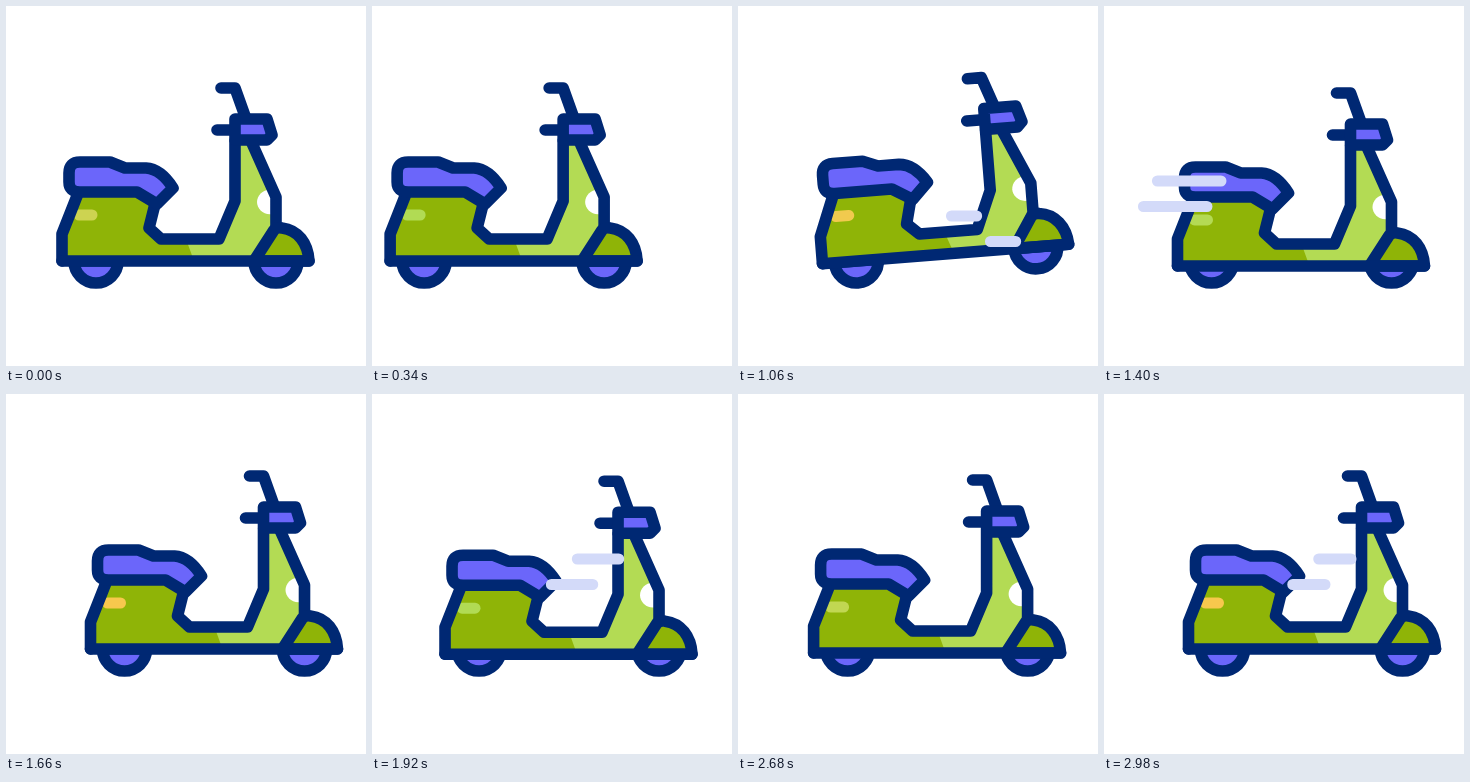
These frames come from a looping animation (360 px wide and 360 px high, 3000 ms). An HTML page:

```html
<!DOCTYPE html>
<html lang="en">
<head>
<meta charset="utf-8">
<title>Scooter</title>
<style>
  html, body { margin: 0; width: 100%; height: 100%; overflow: hidden; background: #fff; }
  svg { display: block; width: 100vw; height: 100vh; }
  #bike { stroke: #002873; stroke-width: 11.6; stroke-linecap: round; stroke-linejoin: round; fill: none; }
  .purple { fill: #6b66fa; }
  .dark { fill: #8fb407; }
  .flat { stroke: none; }
  #streaks { stroke: #d3daf9; stroke-width: 11; stroke-linecap: round; }
</style>
</head>
<body>
<svg viewBox="0 0 360 360">
  <g id="bike">
    <path class="purple" d="M68 255a22 22 0 0 0 44 0zM248 255a22 22 0 0 0 44 0z"/>
    <g id="body">
      <path class="dark flat" d="M56 255V228L71 188H132L150 198 143 222 155 233H215V255z"/>
      <path class="flat" fill="#b3db54" d="M229 135H245L270 189 271 218 247 255H188L180 233H213L229 195z"/>
      <path class="flat" fill="#fff" d="M267 184C258 182 251 189 251 196S258 210 267 208z"/>
      <path id="lamp" stroke-width="11" d="M73 209H86"/>
      <path d="M56 255V228L71 190M149 198L143 222 155 233H213L229 195V135M245 135L270 191V220"/>
      <path class="dark" d="M248 255L268 224Q271 221 276 222C292 224 302 237 303 255z"/>
      <path d="M56 255H303"/>
      <path class="purple" d="M74 156H104L119 162H140Q155 163 167 182L151 198 131 186H74Q63 186 63 176V167Q63 156 74 156z"/>
      <path d="M215 82H229L239 110M211 124H230"/>
      <path class="purple" d="M229 113H261L266 129 261 134H229z"/>
    </g>
  </g>
  <g id="streaks"></g>
</svg>
<script>
const LOOP = 3000;
const $ = id => document.getElementById(id);
const clamp = u => Math.min(1, Math.max(0, u));
const linear = u => u;
const smooth = u => (1 - Math.cos(Math.PI * u)) / 2;
const ramp = (t, from, to) => smooth(clamp((t - from) / (to - from)));

// The body swings up and down between these times.
const turns = [1080, 1450, 1660, 1930, 2220, 2580, 2900];
const sink = t => turns.slice(1).reduce(
  (sum, end, i) => sum + (i % 2 ? -1 : 1) * ramp(t, turns[i], end), 0);

const drive = t => 69.5 * ramp(t, 415, 1080) - 41 * ramp(t, 0, 415);
const tilt = t => 4.5 * (ramp(t, 1080, 1300) - ramp(t, 430, 680));
const glow = t => .4 * (1 - ramp(t, 0, 150)) + ramp(t, 750, 1130);

// Each gust is two streaks; the lower one starts `gap` to the side.
const quick = { time: 255, delay: 72, reach: 195, gap: -26, ease: smooth };
const gusts = [
  { start: 600, x: 278, y: 210, time: 600, delay: 180, reach: 84, gap: 39, ease: linear },
  { ...quick, start: 1180, x: 240, y: 175, gap: -14 },
  { ...quick, start: 1843, x: 247, y: 165 },
  { ...quick, start: 2349, x: 260, y: 206 },
  { ...quick, start: 2913, x: 247, y: 165 }
];

function streak({ start, x, y, time, delay, reach, ease }, t) {
  const age = t - start;
  if (age <= 0 || age >= time + delay) return '';
  const at = a => x - reach * ease(clamp(a / time));
  return `M${at(age)} ${y}H${at(age - delay)}`;
}

const streaks = document.createElementNS('http://www.w3.org/2000/svg', 'path');
$('streaks').append(streaks);

function draw(t) {
  const low = sink(t);
  $('bike').setAttribute('transform',
    `translate(${drive(t) - 11.5 * low}) rotate(${tilt(t)} 90 255)`);
  $('body').setAttribute('transform', `translate(0 ${5.2 * low})`);

  const warm = clamp(glow(t) - low);
  const mix = (a, b) => a + (b - a) * warm;
  $('lamp').style.stroke = `rgb(${mix(177, 247)},${mix(219, 200)},${mix(84, 77)})`;

  streaks.setAttribute('d', gusts.map(g =>
    streak(g, t) + streak({ ...g, x: g.x + g.gap, y: g.y + 25.5 }, t)).join(''));
}

const begin = performance.now();
function frame() {
  draw((performance.now() - begin) % LOOP);
  requestAnimationFrame(frame);
}
frame();
</script>
</body>
</html>
```
